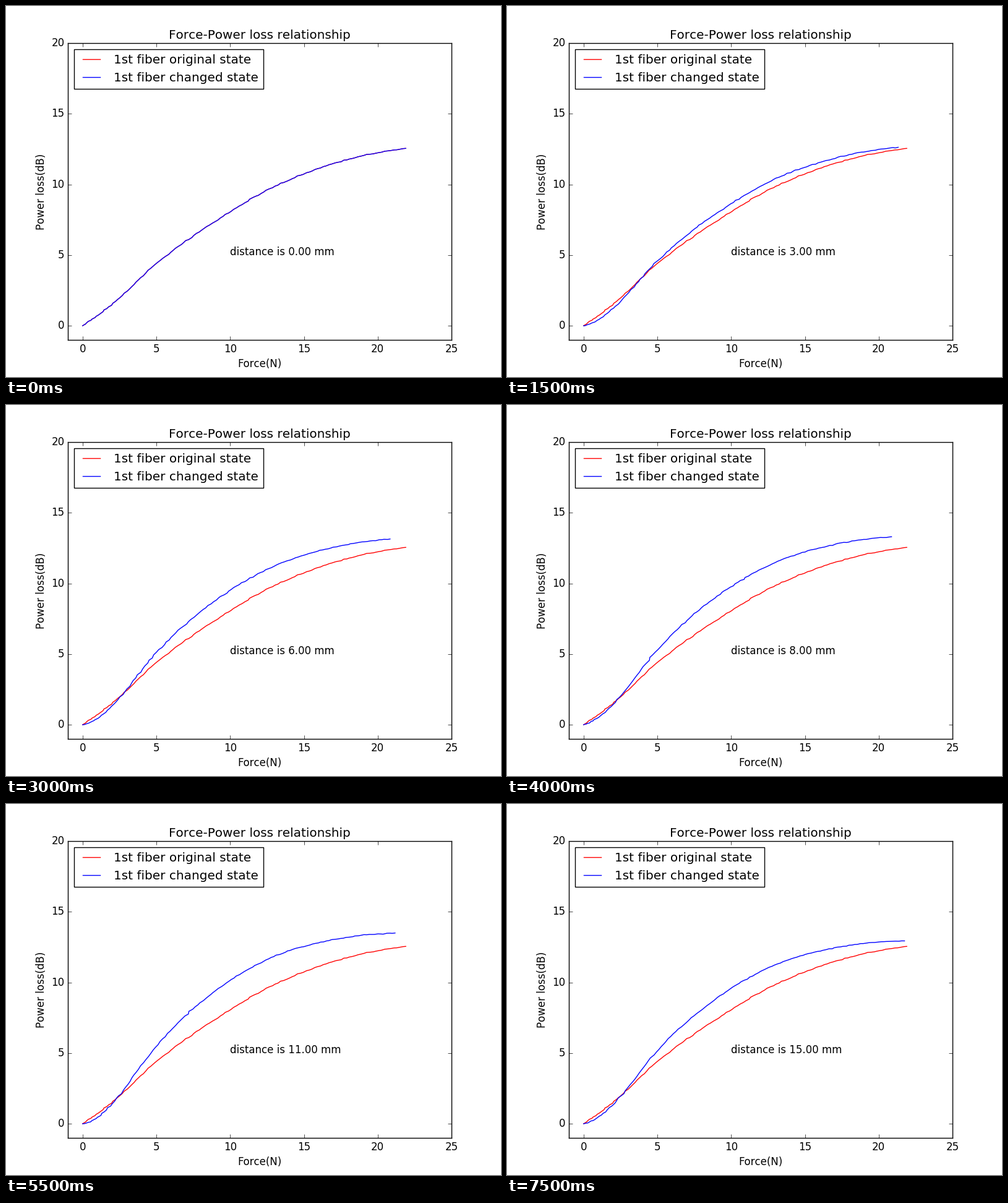
A matplotlib script for the animation above (8 s loop, 800 by 600 pixels).

```python
import numpy as np
import matplotlib.pyplot as plt
from matplotlib.animation import FuncAnimation

plt.style.use("classic")
plt.rcParams.update({
    "font.family": "DejaVu Sans",
    "text.kerning_factor": 6,
    "figure.dpi": 100,
    "savefig.dpi": 100,
    "figure.facecolor": "white",
})

STEPS = 16          # one millimetre per step
POINTS = 125

# Undisturbed fiber: loss at a few forces
FORCE = [0, 2, 5, 9, 13, 17, 21.9]
LOSS = [0, 1.52, 4.40, 7.40, 9.85, 11.47, 12.55]

# Change with distance: distance, hump, dip, tail drop, last force
KEYS = np.array([
    [0, 0, 0, 0, 21.9],
    [2, 0.25, 0.30, 0.18, 21.6],
    [4, 1.08, 0.43, 0.08, 21.05],
    [8, 1.74, 0.33, 0, 20.87],
    [10, 2.10, 0.30, 0, 21.05],
    [13, 1.95, 0.70, 0.10, 21.47],
    [15, 1.62, 0.40, 0.30, 21.75],
])


def smooth(x, y, q):
    """Cubic Hermite curve through (x, y), evaluated at q."""
    x, y, q = (np.asarray(v, float) for v in (x, y, q))
    m = np.gradient(y, x, edge_order=2)
    i = np.clip(np.searchsorted(x, q, side="right") - 1, 0, len(x) - 2)
    h = x[i + 1] - x[i]
    t = (q - x[i]) / h
    return ((1 + 2 * t) * (1 - t) ** 2 * y[i] + t * (1 - t) ** 2 * h * m[i]
            + t * t * (3 - 2 * t) * y[i + 1] + t * t * (t - 1) * h * m[i + 1])


def bump(x, peak, power):
    """Rises from 0 to 1 at the peak, then decays."""
    u = x / peak
    return u ** power * np.exp(power * (1 - u))


def curve(d):
    hump, dip, drop, end = (smooth(KEYS[:, 0], k, d) for k in KEYS.T[1:])
    x = end * np.linspace(0, 1, POINTS) ** 1.15
    y = (smooth(FORCE, LOSS, x) + hump * bump(x, 10.5, 2.2)
         - dip * bump(x, 2, 1) - drop * (x / 20) ** 2)
    # measuring noise, with both ends fixed
    rng = np.random.RandomState(d + 1)
    x[1:-1] += rng.normal(0, 0.025, POINTS - 2)
    y[1:-1] += rng.normal(0, 0.015, POINTS - 2)
    return x, np.maximum(y, 0)


fig = plt.figure(figsize=(8, 6), dpi=100, facecolor="white")
ax = fig.add_axes([0.125, 0.1, 0.775, 0.8])
ax.plot(*curve(0), "r", label="1st fiber original state")
changed, = ax.plot(*curve(0), "b", label="1st fiber changed state")
note = ax.text(10, 5, "")
ax.set(xlim=(-1, 25), ylim=(-1, 20),
       xticks=range(0, 26, 5), yticks=range(0, 21, 5),
       xlabel="Force(N)", ylabel="Power loss(dB)",
       title="Force-Power loss relationship")
ax.legend(loc="upper left")


def update(d):
    changed.set_data(*curve(d))
    note.set_text(f"distance is {d:.2f} mm")
    return changed, note


anim = FuncAnimation(fig, update, frames=STEPS, interval=500,
                     repeat=True, repeat_delay=0)
plt.show()
```
